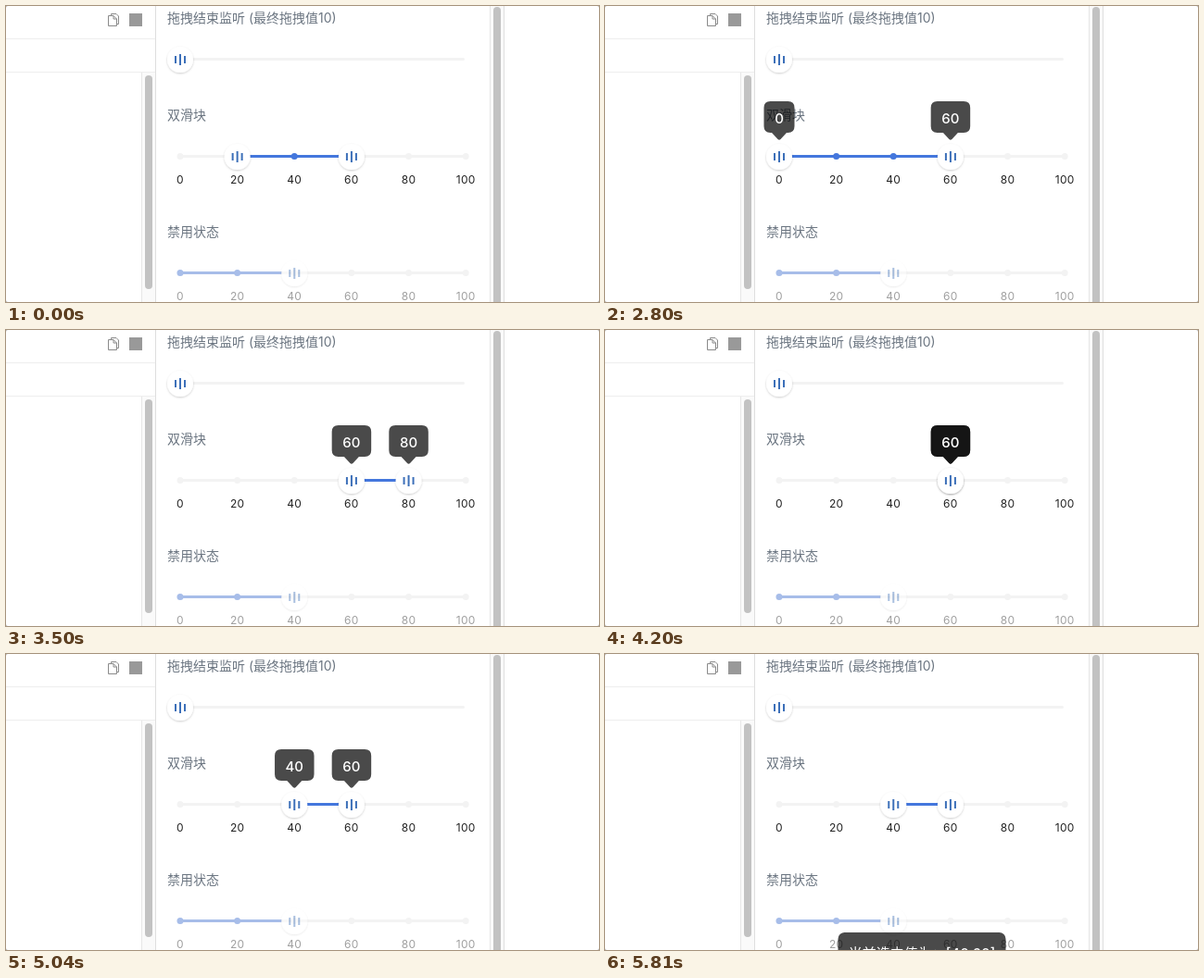
Write an HTML page that moves like this. It is 640 px wide and 320 px high and loops after 6090 ms.

```html
<!DOCTYPE html>
<html lang="zh">
<head>
<meta charset="utf-8">
<style>
  html, body { margin: 0; width: 100%; height: 100%; overflow: hidden; background: #aaa; }
  svg { display: block; width: 640px; height: 320px; font-family: Inter, "Noto Sans CJK SC", "Noto Sans CJK", sans-serif; }
  .title { font-size: 14px; fill: #6b7581; }
  .mark { font-size: 12px; letter-spacing: .3px; fill: #222; text-anchor: middle; }
  .tip text { font-size: 15px; font-weight: 500; fill: #fff; text-anchor: middle; }
  .toast text { font-size: 15px; font-weight: 500; fill: #fff; text-anchor: middle; }
  .rail { fill: #f3f3f3; }
  .active { fill: #4477dd; }
  .grip { stroke: #3d70b9; stroke-width: 2; fill: none; }
  .line { stroke: #eee; fill: none; }
  .bar { fill: #fafafa; }
  .thumb { fill: #c2c2c2; }
  .shade { fill: #000; fill-opacity: .71; }
</style>
</head>
<body>
<svg viewBox="0 0 640 320">
  <defs>
    <filter id="shadow" x="-30%" y="-30%" width="160%" height="160%">
      <feDropShadow dx="0" dy="1" stdDeviation="1" flood-color="#000" flood-opacity=".2"/>
    </filter>
    <g id="handle">
      <circle r="14" fill="#fff" filter="url(#shadow)"/>
      <path class="grip" d="M-5-4v8M0-6v12M5-4v8"/>
    </g>
  </defs>
  <rect width="640" height="320" rx="2" fill="#fff"/>

  <rect class="bar" x="147" y="72" width="14" height="248"/>
  <rect class="bar" x="523" width="14" height="320"/>
  <path class="line" d="M0 35.5H161M0 71.5H161"/>
  <path class="line" stroke-width="1" style="stroke:#e6e6e6" d="M146.5 72V320M522.5 0V320"/>
  <path class="line" style="stroke:#dedede" d="M161.5 0V320M537.5 0V320"/>
  <rect class="thumb" x="150" y="75" width="8" height="231" rx="4"/>
  <rect class="thumb" x="526" y="1" width="8" height="330" rx="4"/>
  <path fill="none" stroke="#8a8a8a" d="M113.5 10.5V8.500H119L121.500 11V19.500H119.500M110.500 10.500H116L119.500 14V21.500H110.500ZM116 10.500V14H119.500"/>
  <rect x="133" y="8" width="14" height="14" fill="#999"/>

  <text class="title" x="174" y="18">拖拽结束监听 (最终拖拽值10)</text>
  <text class="title" x="174" y="123">双滑块</text>
  <text class="title" x="174" y="249">禁用状态</text>

  <rect class="rail" x="188" y="56" width="307" height="3" rx="1.5"/>
  <use href="#handle" x="188" y="58"/>
  <g id="dual"></g>
  <g id="disabled"></g>
  <g id="tips"></g>
  <g id="toast" class="toast">
    <rect class="shade" x="251.5" y="301" width="181" height="44" rx="7"/>
    <text x="342" y="329">当前选中值为：[40,60]</text>
  </g>
</svg>
<script>
const LOOP = 6090;
const MARKS = [0, 20, 40, 60, 80, 100];
// start time, low value, high value
const STEPS = [
  [0, 20, 60], [2380, 40, 60], [2800, 0, 60], [3220, 40, 60], [3290, 60, 60],
  [3500, 60, 80], [3780, 60, 100], [4200, 60, 60], [4340, 40, 60],
  [4480, 20, 60], [5040, 40, 60]
];
const FADE = [[0, 0], [5460, .2], [5530, .5], [5600, .8], [5670, .97], [5810, 1]];
const TIPS_ON = 2240, TIPS_OFF = 5530;

const $ = id => document.getElementById(id);
const at = (list, t) => list.filter(item => item[0] <= t).pop();
const posX = value => 188 + value * 3.082;

const dots = (values, y, cls) =>
  values.map(v => `<circle class="${cls}" cx="${posX(v)}" cy="${y}" r="3.5"/>`).join('');

function slider(y, low, high, knobs, opacity) {
  const inside = MARKS.filter(v => v >= low && v <= high);
  return `<rect class="rail" x="188" y="${y - 1.5}" width="308" height="3"/>` +
    dots(MARKS, y, 'rail') +
    `<g opacity="${opacity}">
      <rect class="active" x="${posX(low)}" y="${y - 1.5}" width="${posX(high) - posX(low)}" height="3"/>` +
    dots(inside, y, 'active') +
    knobs.map(v => `<use href="#handle" x="${posX(v)}" y="${y + .5}"/>`).join('') +
    MARKS.map(v => `<text class="mark" x="${posX(v)}" y="${y + 29.5}">${v}</text>`).join('') +
    '</g>';
}

function tip(value) {
  const w = value > 99 ? 51 : value > 9 ? 42.5 : 33;
  return `<g class="tip" transform="translate(${posX(value)} 103)">
    <path class="shade" d="M${7 - w / 2} 0H${w / 2 - 7}q7 0 7 7V27q0 7-7 7H8L1.500 41q-1.500 1.500-3 0L-8 34H${7 - w / 2}q-7 0-7-7V7q0-7 7-7Z"/>
    <text y="23.5">${value}</text></g>`;
}

let shown = '';
function draw(t) {
  const [, low, high] = at(STEPS, t);
  const tipsOn = t >= TIPS_ON && t < TIPS_OFF;
  const key = [low, high, tipsOn].join();
  if (key !== shown) {
    shown = key;
    $('dual').innerHTML = slider(162.5, low, high, [low, high], 1);
    $('tips').innerHTML = tipsOn ? tip(low) + tip(high) : '';
  }
  $('toast').setAttribute('opacity', at(FADE, t)[1]);
}

$('disabled').innerHTML = slider(288.5, 0, 40, [40], .43);
const start = performance.now();
function frame() {
  draw((performance.now() - start) % LOOP);
  requestAnimationFrame(frame);
}
frame();
</script>
</body>
</html>
```
